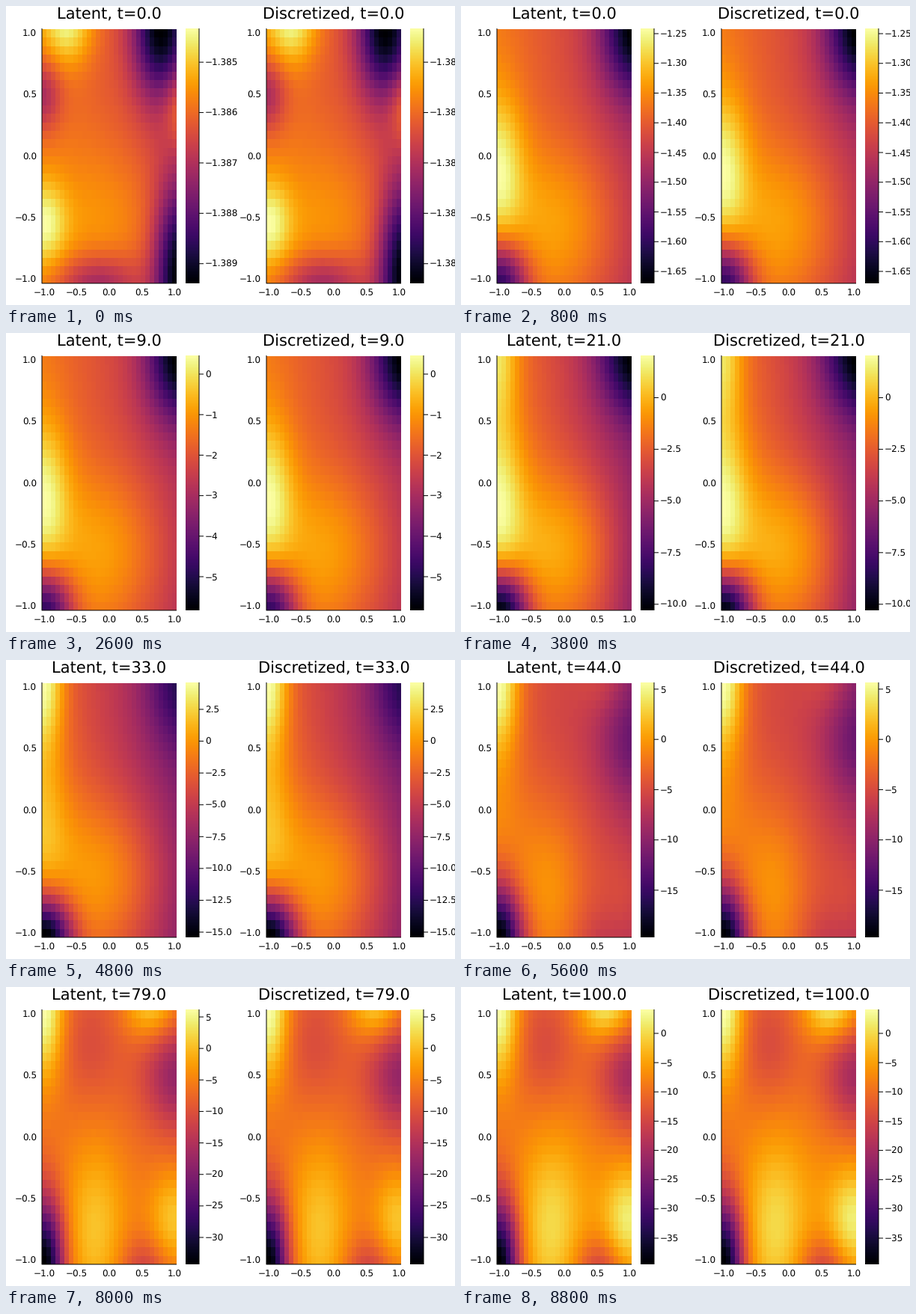
A matplotlib script for the animation above (9 s loop, 600x400 px).

```python
import math

import matplotlib.pyplot as plt
import numpy as np
from matplotlib.animation import FuncAnimation

DPI = 100
PX = 72 / DPI          # points per pixel
TOP, BOTTOM = 30, 371
FRAMES, INTERVAL = 45, 200

plt.rcParams["font.family"] = "DejaVu Sans"
plt.rcParams["text.hinting"] = "no_hinting"


def spline(p, v, q):
    """Cubic Hermite curve through v at positions p, sampled at q (axis 0)."""
    p, v = np.asarray(p, float), np.asarray(v, float)
    q = np.atleast_1d(np.asarray(q, float))
    m = np.gradient(v, p, axis=0, edge_order=2)
    i = np.clip(np.searchsorted(p, q, side="right") - 1, 0, len(p) - 2)
    shape = (-1,) + (1,) * (v.ndim - 1)
    h = (p[i + 1] - p[i]).reshape(shape)
    s = (q - p[i]).reshape(shape) / h
    return ((1 + 2 * s) * (1 - s) ** 2 * v[i] + s * (1 - s) ** 2 * h * m[i]
            + s * s * (3 - 2 * s) * v[i + 1] + s * s * (s - 1) * h * m[i + 1])


X, Y = np.meshgrid(np.linspace(-1, 1, 30), np.linspace(1, -1, 30))


def hill(cx, cy, wx, wy):
    return np.exp(-((X - cx) / wx) ** 2 - ((Y - cy) / wy) ** 2)


def scaled(shape, lo, hi):
    unit = (shape - shape.min()) / np.ptp(shape)
    return lo + (hi - lo) * unit


# Shapes shared by several moments of the flow.
centre = hill(0, -0.55, 0.95, 0.7)
left = hill(-1, -0.1, 0.38, 0.62)
top_left = hill(-1, 1.05, 0.3, 0.57)
top_right = hill(1.1, 1.05, 0.52, 0.52)
low_left = hill(-1, -1.05, 0.42, 0.35)
low_left_tall = hill(-1, -1.05, 0.29, 0.54)
ridge = hill(-0.22, -0.8, 0.45, 0.75)
right_dip = hill(1.05, 0.5, 0.5, 0.42)
right_rise = hill(1, -0.67, 0.38, 0.42)
top_rise = hill(0.65, 1.08, 0.42, 0.28)
top_dip = hill(-0.3, 0.75, 0.45, 0.45)
notch = hill(0.53, -1.1, 0.35, 0.27)

start = (0.62 - 0.08 * X + 0.14 * centre
         + 0.32 * hill(-0.65, 1.1, 0.4, 0.35)
         - 0.58 * hill(0.78, 1.05, 0.41, 0.55)
         - 0.26 * hill(-1.05, 0.5, 0.3, 0.3)
         + 0.20 * hill(1.1, 0.4, 0.25, 0.3)
         + 0.27 * hill(-1, -0.55, 0.35, 0.35)
         - 0.28 * hill(-0.2, -1.05, 0.6, 0.25)
         - 0.57 * hill(1.05, -0.95, 0.35, 0.7))
growth = (0.60 - 0.12 * X + 0.20 * centre + 0.26 * left
          - 0.50 * top_right - 0.62 * low_left)
middle = (0.52 - 0.16 * X + 0.22 * centre + 0.12 * left + 0.30 * top_left
          - 0.22 * top_right - 0.75 * low_left)
late = (0.62 - 0.05 * X + 0.15 * ridge + 0.33 * top_left + 0.16 * top_rise
        - 0.04 * top_dip - 0.24 * right_dip + 0.13 * right_rise
        - 0.08 * notch - 0.67 * low_left_tall)
end = (0.70 + 0.08 * centre + 0.15 * ridge + 0.32 * top_left
       + 0.27 * top_rise - 0.10 * top_dip - 0.24 * right_dip
       + 0.24 * right_rise - 0.18 * notch - 0.70 * low_left_tall)

KEY_STEPS = [0, 4, 13, 24, 32, 40, 44]
KEY_TIMES = [0, 0.49, 9, 33, 56, 79, 100]
KEY_FIELDS = [
    scaled(start, -1.38939, -1.38433),
    scaled(growth, -1.6701, -1.2412),
    scaled(growth, -5.83, 0.461),
    scaled(middle, -15.41, 4.614),
    scaled(late, -24.17, 6.06),
    scaled(0.35 * late + 0.65 * end, -34.27, 6.19),
    scaled(end, -39.47, 4.09),
]

# The root of the time grows almost evenly with the solver's steps.
TIMES = spline(KEY_STEPS, np.sqrt(KEY_TIMES), np.arange(FRAMES)) ** 2


def nice_ticks(lo, hi):
    """Return tick values and decimals for five to ten round steps."""
    power = math.floor(math.log10(hi - lo))
    best = (-1, [], 0)
    for e in (power - 1, power, power + 1):
        for m, niceness in ((1, 1), (5, 0.9), (2, 0.7), (2.5, 0.5)):
            step = m * 10.0 ** e
            first, last = math.ceil(lo / step), math.floor(hi / step)
            n = last - first + 1
            score = niceness + 1 - abs(n - 5) / 5
            if 5 <= n <= 10 and score > best[0]:
                values = [k * step for k in range(first, last + 1)]
                best = (score, values, max(0, (m == 2.5) - e))
    return best[1:]


def number(value, decimals):
    if abs(value) < 1e-9:
        return "0"
    return f"{value:.{decimals}f}".replace("-", "\u2212")


fig = plt.figure(figsize=(6, 4), dpi=DPI, facecolor="white")
ax = fig.add_axes([0, 0, 1, 1])
ax.axis("off")


def label(x, y, text="", size=12, ha="center"):
    return ax.text(x, y, text, fontsize=size * PX, ha=ha, va="baseline")


def line(xs, ys):
    return ax.plot(xs, ys, color="black", lw=PX, solid_capstyle="butt",
                   snap=False, zorder=3)[0]


def image(data, x0, x1, top):
    return ax.imshow(data, cmap="inferno", vmin=0, vmax=1, aspect="auto",
                     interpolation="nearest", extent=(x0, x1, BOTTOM, top))


class Panel:
    def __init__(self, name, x):
        self.name, self.x = name, x
        self.title = label(x + 138, 18, size=21)
        self.heat = image(np.zeros_like(X), x + 48, x + 228, TOP + 1)
        image(np.linspace(1, 0, 256)[:, None], x + 240, x + 258, TOP)
        line([x + 48, x + 48, x + 228], [TOP, BOTTOM, BOTTOM])
        line([x + 258, x + 258], [TOP, BOTTOM])
        for v in np.linspace(-1, 1, 5):
            text = number(v, 1) if v else "0.0"
            label(x + 138 + 87 * v, 388, text)
            label(x + 41, 205.5 - 164.8 * v, text, ha="right")
        self.marks = [line([x + 258, x + 264], [0, 0]) for _ in range(10)]
        self.labels = [label(x + 266, 0, ha="left") for _ in range(10)]

    def show(self, t, field):
        lo, hi = field.min(), field.max()
        self.title.set_text(f"{self.name}, t={round(t):.1f}")
        self.heat.set_data((field - lo) / (hi - lo))
        values, decimals = nice_ticks(lo, hi)
        for k, (mark, text) in enumerate(zip(self.marks, self.labels)):
            used = k < len(values)
            mark.set_visible(used)
            text.set_visible(used)
            if used:
                y = BOTTOM - (BOTTOM - TOP) * (values[k] - lo) / (hi - lo)
                mark.set_ydata([y, y])
                text.set_y(y + 4.4)
                text.set_text(number(values[k], decimals))


panels = [Panel("Latent", 0), Panel("Discretized", 300)]
ax.set_xlim(0, 600)
ax.set_ylim(400, 0)


def update(frame):
    t = float(TIMES[frame])
    field = spline(KEY_TIMES, KEY_FIELDS, t)[0]
    for panel in panels:
        panel.show(t, field)
    return []


anim = FuncAnimation(fig, update, frames=FRAMES, interval=INTERVAL,
                     init_func=lambda: update(0), repeat=True)
plt.show()
```
